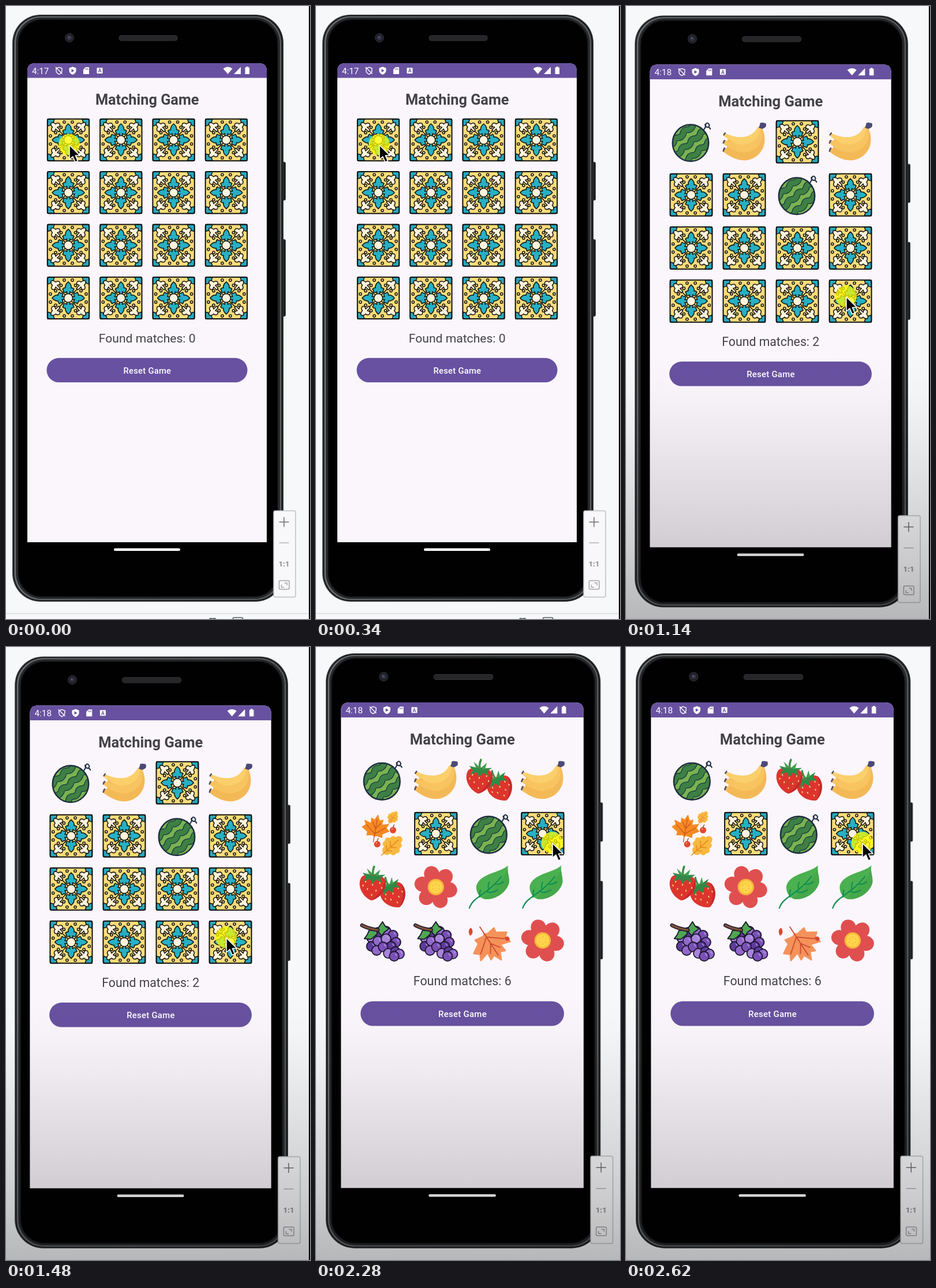
Animation, 527 px wide and 1062 px high, one loop 2.85 s. Source, as an HTML page:

```html
<!DOCTYPE html>
<html lang="en">
<head>
<meta charset="utf-8">
<title>Matching Game</title>
<style>
  html, body { margin: 0; width: 100%; height: 100%; overflow: hidden; background: #f6f8fa; }
  svg { display: block; width: 100%; height: 100%; }
  text { font-family: Roboto, "Noto Sans", sans-serif; }
</style>
</head>
<body>
<svg id="stage" viewBox="0 0 527 1062" preserveAspectRatio="none">
  <defs>
    <linearGradient id="shade" gradientUnits="userSpaceOnUse" x1="0" y1="600" x2="0" y2="1062">
      <stop offset="0" stop-opacity="0"/>
      <stop offset=".14" stop-opacity=".014"/>
      <stop offset=".3" stop-opacity=".05"/>
      <stop offset=".74" stop-opacity=".17"/>
      <stop offset="1" stop-opacity=".26"/>
    </linearGradient>
    <linearGradient id="rim" x1="0" x2="1" y1="0" y2="0">
      <stop offset="0" stop-color="#3d3f42"/>
      <stop offset="1" stop-color="#2c2d30"/>
    </linearGradient>
    <linearGradient id="gloss" x1="0" x2="1" y1="0" y2="0">
      <stop offset="0" stop-color="#6e7175"/>
      <stop offset="1" stop-color="#5c5f62"/>
    </linearGradient>
    <clipPath id="rind"><ellipse cx="-1" cy="2" rx="31" ry="31.5"/></clipPath>
  </defs>
  <rect width="527" height="1062" fill="#f6f8fa"/>
  <g id="scene">
    <path d="M-20 1052.5H540" stroke="#d9dbdf" stroke-width="1.5"/>
    <g fill="none" stroke="#55585c" stroke-width="1.6">
      <path d="M352 1064Q353 1059 358 1062Q363 1059 365 1064"/>
      <rect x="393.5" y="1059.5" width="17" height="14" rx="2"/>
    </g>

    <g fill="#1d1e20" stroke="#3a3b3e">
      <rect x="477" y="270.5" width="7.5" height="66" rx="2"/>
      <rect x="477" y="404.5" width="7.5" height="133" rx="2"/>
    </g>
    <rect x="11" y="15" width="470" height="1017" rx="49" fill="url(#rim)"/>
    <rect x="13.2" y="17" width="465.6" height="1013" rx="47" fill="none" stroke="#1b1c1e" stroke-width="1.6"/>
    <rect x="16" y="19" width="460" height="1009" rx="45" fill="none" stroke="url(#gloss)" stroke-width="2"/>
    <rect x="19" y="21.5" width="454" height="1004" rx="43" fill="#0a0a0b" stroke="#26282a" stroke-width="3.5"/>
    <rect x="22.5" y="25" width="447" height="997" rx="40" fill="#010102"/>
    <rect x="196" y="51" width="101" height="9" rx="4" fill="#262628" stroke="#333336"/>
    <circle cx="110" cy="55" r="7.5" fill="#1f2024" stroke="#2e2f33"/>
    <circle cx="110" cy="55" r="3.8" fill="#34344c"/>
    <circle cx="109" cy="54" r="1.3" fill="#5a5c78"/>

    <path d="M37 929V113Q37 99 51 99H438Q452 99 452 113V929Z" fill="#fbf6fc"/>
    <path d="M37 124.5V113Q37 99 51 99H438Q452 99 452 113V124.5Z" fill="#6851a0"/>
    <text id="clock" x="45" y="118" font-size="15.2" fill="#fff"></text>
    <path d="M92 106.2L97 108V112Q97 116 92 118.3Q87 116 87 112V108ZM86 106L97.5 117.5" fill="none" stroke="#fff" stroke-width="1.4"/>
    <path d="M115.5 105.3L121.5 107.5V112Q121.5 116.5 115.5 119Q109.5 116.5 109.5 112V107.5Z" fill="#fff"/>
    <path d="M113.5 109V115L118.5 112Z" fill="#6851a0"/>
    <path d="M138 106H144V118H134V110Z" fill="#fff"/>
    <path d="M138 108v2.5M140 108v2.5M142 108v2.5" stroke="#6851a0"/>
    <rect x="157.5" y="107" width="10" height="10" rx="1" fill="#fff"/>
    <text x="162.5" y="115.3" font-size="8.5" font-weight="700" text-anchor="middle" fill="#6851a0">A</text>
    <path d="M376.5 108.5Q384.5 102.5 392.5 108.5L384.5 118ZM395 118H407V105.5ZM414.5 106.5H416.5V105H420V106.5H422V118H414.5Z" fill="#fff"/>

    <text x="244.7" y="171" font-size="25.3" font-weight="700" text-anchor="middle" fill="#434247">Matching Game</text>
    <g id="board"></g>
    <text id="score" x="244.7" y="582.7" font-size="21.1" text-anchor="middle" fill="#434247"></text>
    <rect x="70.5" y="609.8" width="348" height="42.2" rx="21" fill="#6851a0"/>
    <text x="244.9" y="636.5" font-size="14.8" font-weight="500" letter-spacing=".25" text-anchor="middle" fill="#fff">Reset Game</text>
    <rect x="187" y="939.5" width="115" height="4.5" rx="2.2" fill="#fff"/>

    <rect x="464" y="874.5" width="38" height="149.5" rx="3" fill="#f8f8fa" stroke="#bfc0c3" stroke-width="1.5"/>
    <g fill="none" stroke="#6d6e71" stroke-width="1.5">
      <path d="M473.5 894H490.5M482 885.5V902.5"/>
      <path d="M473.5 930H490.5" stroke="#b0b1b4"/>
      <g stroke="#a2a3a6">
        <rect x="473.5" y="995.5" width="17.5" height="15" rx="2"/>
        <path d="M482.5 999.5H487V1003.5M477.5 1002.5V1007H482"/>
      </g>
    </g>
    <text x="482" y="971" font-size="13" font-weight="900" text-anchor="middle" fill="#97989b">1:1</text>
  </g>
  <rect id="dim" width="527" height="1062" fill="url(#shade)"/>
  <rect id="edge" x="525" width="2" height="1062" fill="#050505"/>
  <g id="pointer">
    <circle cx="0" cy="-1" r="18.5" fill="#fcfc00" opacity=".75"/>
    <path d="M0.5 0V25L6.3 19.7L10.5 29.5L15 27.5L10.8 18H18.5Z" fill="#050505" stroke="#fff" stroke-width="1.5" stroke-linejoin="round"/>
  </g>
</svg>
<script>
const NS = "http://www.w3.org/2000/svg";
const $ = id => document.getElementById(id);
const turns = (n, art, from = 0) =>
  Array.from({ length: n }, (_, i) => `<g transform="rotate(${from + i * 360 / n})">${art}</g>`).join("");
const place = (x, y, r, s, art) =>
  `<g transform="translate(${x} ${y}) rotate(${r}) scale(${s})">${art}</g>`;
const path = (d, fill, more = "") => `<path d="${d}" fill="${fill}" ${more}/>`;
const line = (d, color, w) => path(d, "none", `stroke="${color}" stroke-width="${w}" stroke-linecap="round" stroke-linejoin="round"`);
const oval = (x, y, rx, ry, fill, more = "") =>
  `<ellipse cx="${x}" cy="${y}" rx="${rx}" ry="${ry}" fill="${fill}" ${more}/>`;
const dot = (x, y, r, fill, more) => oval(x, y, r, r, fill, more);

function tile() {
  const ink = 'stroke="#141311" stroke-width="1.5" stroke-linejoin="round"';
  const frame = (fill, more) =>
    `<rect x="-36.2" y="-36.2" width="72.4" height="72.4" rx="3" fill="${fill}" ${more}/>`;
  const corner = path("M-36-24Q-26-26-24-36H-36Z", "#27a8bd", ink);
  const bud = path("M-2-22V-29Q-8-25-9-31Q-8-35-4-35Q-4-40 0-42Q4-40 4-35Q8-35 9-31Q8-25 2-29V-22Z", "#fff3dc", ink);
  const arm = path("M-2.5-6V-11Q-6-8-8.5-11Q-7.5-13-10-15.5Q-8-18-5-17.5Q-6-23 0-28Q6-23 5-17.5Q8-18 10-15.5Q7.5-13 8.5-11Q6-8 2.5-11V-6Z", "#27b0c4", ink);
  const rings = [[-12.5, -22], [12.5, -22], [-7, -31], [7, -31]]
    .map(([x, y]) => dot(x, y, 2.1, "#ffe9a6", ink)).join("");
  return frame("#fcdc79", "") + turns(4, corner) +
    turns(4, line("M0-8V-23", "#141311", 1.6) + bud, 45) +
    turns(4, rings + arm) + dot(0, 0, 7.5, "#fff3dc", ink) +
    frame("none", 'stroke="#111" stroke-width="2"');
}

function banana() {
  return path("M23-25C14-4-8-6-28-11L-30 14C-14 30 28 30 34-4L29-26Z", "#f3b755") +
    path("M30-25C43 2 30 25 8 31C-10 35-26 25-36 17C-38 13-36 10-33 10C-14 20 14 14 29-25Z", "#f4b957") +
    path("M29-25C37-4 24 15 2 18C-14 19-27 10-36 3C-38-2-36-4-33-3C-10 6 14 4 27-25Z", "#f8c461") +
    path("M27-25C27-6 14 3-2 5C-14 6-28-4-35-10C-37-14-35-16-31-14C-10-5 12-4 24-26Z", "#fbcf6b") +
    line("M-35-12L-33-15M-36 2L-34-2M-36 16L-34 11", "#4a4a70", 2.5) +
    path("M25-24L27-30Q26-33 31-33L37-32Q39-26 35-24L31-22Z", "#4b4a78");
}

function melon() {
  const wave = y => `M-42 ${y}` + "q5-5 10-1t11 1".repeat(4);
  const stripes = [-20, 0, 20].map(y =>
    line(wave(y), "#1c3440", 11.5) + line(wave(y), "#3d8044", 9)).join("");
  return oval(-1, 2, 31, 31.5, "#78b350") +
    `<g clip-path="url(#rind)">${place(-1, 2, -40, 1, stripes)}</g>` +
    oval(-1, 2, 31, 31.5, "none", 'stroke="#1d2b3f" stroke-width="2.4"') +
    line("M21-20Q25-24 25-30Q27-34 30-31Q33-27 29-25Q24-25 24-30M29-25Q32-25 33-22", "#1d2b3f", 2);
}

function berry() {
  const seeds = [[-9, -3], [0, 0], [9, -3], [-6, 6], [5, 7], [0, 13], [-12, 2], [12, 3]]
    .map(([x, y]) => oval(x, y, .8, 1.3, "#fbd574")).join("");
  return path("M0 20C-12 16-20 2-15-8C-10-15 10-15 15-8C20 2 12 16 0 20Z", "#dc352e") +
    path("M0 20C12 16 20 2 15-8Q14 8 0 20Z", "#c42a2b") + seeds +
    path("M0-12L-14-14L-9-9L-12-3L-4-7L0-1L4-7L12-3L9-9L15-14Z", "#2f8a46") +
    line("M0-11Q-2-17 0-23", "#3c8f45", 2.6) + path("M0-13L-9-20L-5-12ZM1-13L8-20L6-11Z", "#43a04f");
}

const half = [[5, -19], [12, -22], [11, -11], [25, -15], [21, -7], [28, -1], [15, 7], [16, 14], [4, 12]];
const mapleD = "M0-30L" + half.join("L") + "L0 14L" +
  half.slice().reverse().map(([x, y]) => [-x, y]).join("L") + "Z";
const maple = (fill, vein) => path(mapleD, fill, `stroke="${fill}" stroke-width="2" stroke-linejoin="round"`) +
  line("M0-22V26M0 9L-20-7M0 9L20-7M0-2L-8-14M0-2L8-14", vein, 1.5);

function autumn() {
  const oak = path("M0 19Q-8 17-7 11Q-15 11-13 4Q-18-1-11-5Q-12-12-6-12Q-5-19 0-19Q5-19 6-12Q12-12 11-5Q18-1 13 4Q15 11 7 11Q8 17 0 19Z", "#f9b83f") +
    line("M0-12V23M0 4L-7-2M0 4L7-2M0 12L-6 7M0 12L6 7", "#e58a25", 1.4);
  return place(-12, -7, 10, .82, maple("#f68a20", "#c95026")) +
    place(17, 20, 48, 1.1, oak) + place(18, -28, 35, .62, oak) +
    dot(18, -6, 5.5, "#e2492f") + dot(-9, 18, 5.5, "#e2492f") +
    line("M18-11L20-15M-9 12L-7 8", "#8a4a34", 1.4) +
    dot(16.5, -8, 1.4, "#f28a6b") + dot(-10.5, 16, 1.4, "#f28a6b");
}

function flower() {
  return turns(6, oval(0, -23, 13, 14, "#e04f4f"), -18) +
    dot(0, 0, 20, "#e04f4f") + dot(0, 0, 14, "#f8b83c") + dot(0, 0, 11, "#fdd44b") +
    turns(6, dot(0, -6, .9, "#efae31"));
}

function leaf() {
  return path("M32-37C18-24-16-24-22-2C-23 8-18 17-10 20C8 24 30 10 34-8C35-18 30-26 32-37Z", "#4bb04f") +
    path("M-10 20C8 24 30 10 34-8C35-18 30-26 32-37C30-12 6 0-10 20Z", "#45a84b") +
    line("M-34 36C-28 16-4 14 21-18M-16 17Q-17 10-15 5M-1 5Q-3-3 0-8M-4 8Q6 11 14 5M10-5Q18-4 24-9", "#128f53", 2.2);
}

function grapes() {
  const ink = 'stroke="#1c1530" stroke-width="1.8" stroke-linejoin="round"';
  const spots = [[-7, -14], [6, -16], [18, -9], [-18, -4], [-19, 10], [-8, 1], [23, 3],
    [6, -3], [15, 10], [-10, 17], [1, 11], [10, 22], [22, 19], [29, 23], [20, 27]];
  const fills = ["#5f3c9b", "#9269cb", "#7a50b6", "#a884da"];
  return spots.map(([x, y], i) =>
    dot(x, y, 8.2, fills[i % 4], ink) + line(`M${x + 2} ${y - 4}q2 1 2 3`, "#cdb4ee", 1.1)).join("") +
    path("M-9-19L0-32L5-24L11-20L3-14L-1-8L-6-13ZM-10-18L-23-17L-26-10L-31-3L-20-2L-15-6L-9-11Z", "#4fa652", ink) +
    line("M-35-26Q-24-20-8-18", "#1c1530", 6.5) + line("M-35-26Q-24-20-8-18", "#7d5238", 3.5);
}

function solo() {
  return place(1, 3, 147, 1.2, maple("#f4925a", "#cf4a2f")) +
    path("M-31-22Q-38-18-33-8Q-25-13-31-22ZM26-5Q34-10 35-1Q29 4 26-5Z", "#d9482f");
}

const art = {
  tile: tile(), banana: banana(), melon: melon(),
  straw: place(18, 11, -26, 1.3, berry()) + place(-17, -4, 5, 1.35, berry()),
  autumn: autumn(), flower: flower(), leaf: leaf(), grapes: grapes(), solo: solo()
};
const defs = document.querySelector("defs");
for (const id in art) defs.insertAdjacentHTML("beforeend", `<g id="${id}">${art[id]}</g>`);

const cells = Array.from({ length: 16 }, (_, i) => {
  const use = document.createElementNS(NS, "use");
  use.setAttribute("x", 108 + (i % 4) * 91.3);
  use.setAttribute("y", 232 + (i >> 2) * 91.3);
  return $("board").appendChild(use);
});

const step = 570;
const steps = [
  { at: [0, 0, 1], tip: [109.5, 241], time: "4:17", found: 0, open: {} },
  { at: [-.5, -5.1, 1.021], tip: [232, 266.5], time: "4:17", found: 1, open: { 1: "banana", 3: "banana" } },
  { at: [4.1, 1.4, 1.008], tip: [381.5, 504], time: "4:18", found: 2,
    open: { 0: "melon", 1: "banana", 3: "banana", 6: "melon" } },
  { at: [6, -14.8, 1.028], tip: [312, 324], time: "4:18", found: 1,
    open: { 0: "melon", 1: "banana", 3: "banana" } },
  { at: [5.8, -4.3, 1.0135], tip: [409.5, 340], time: "4:18", found: 6,
    open: ["melon", "banana", "straw", "banana", "autumn", "tile", "melon", "tile",
      "straw", "flower", "leaf", "leaf", "grapes", "grapes", "solo", "flower"] }
];

function show(i) {
  const { at: [x, y, s], tip, time, found, open } = steps[i];
  $("scene").setAttribute("transform", `translate(${x} ${y}) scale(${s})`);
  $("pointer").setAttribute("transform", `translate(${tip}) scale(${s})`);
  $("clock").textContent = time;
  $("score").textContent = "Found matches: " + found;
  $("dim").style.display = i ? "" : "none";
  $("edge").style.display = i < 4 ? "" : "none";
  cells.forEach((c, n) => c.setAttribute("href", "#" + (open[n] || "tile")));
}

let shown = 0;
show(0);
const start = performance.now();
function tick(now) {
  const i = Math.floor(Math.max(0, now - start) / step) % steps.length;
  if (i !== shown) show(shown = i);
  requestAnimationFrame(tick);
}
requestAnimationFrame(tick);
</script>
</body>
</html>
```
